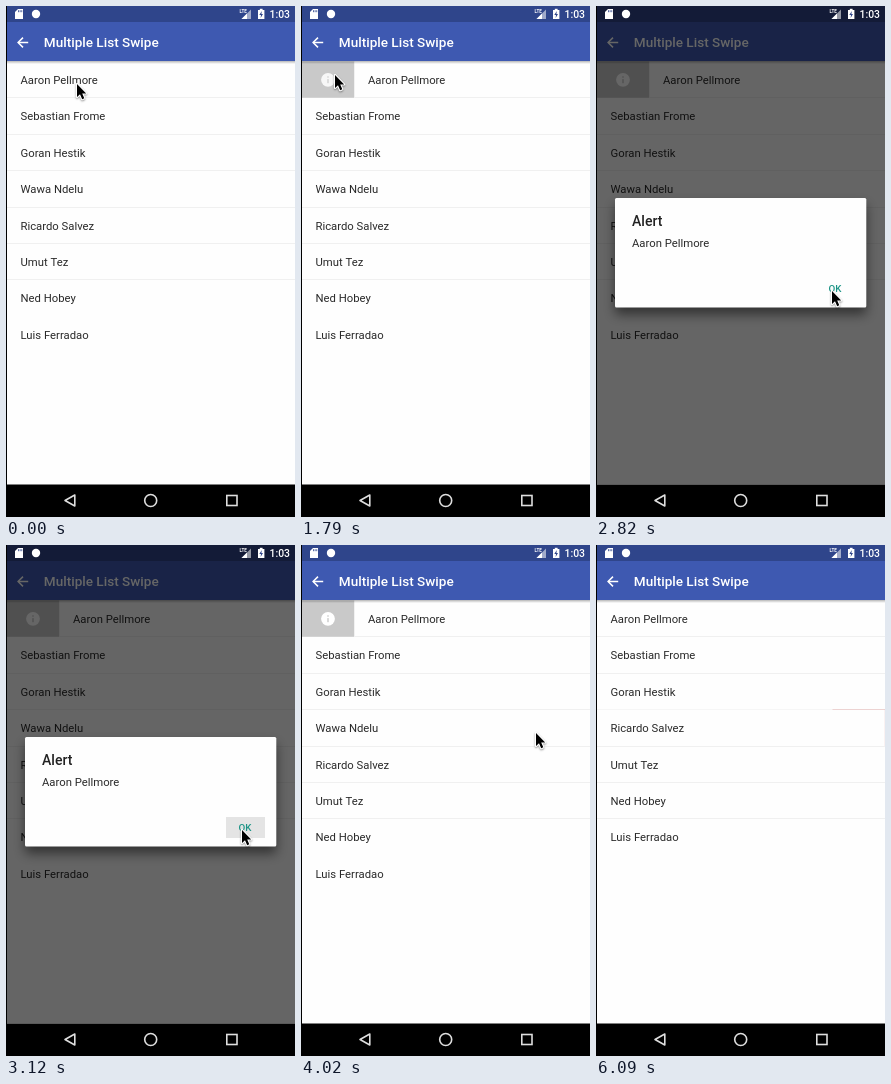
Write an HTML page with a canvas that moves like this. It is 289 px wide and 511 px high and loops after 6.54 s.

```html
<!DOCTYPE html>
<html lang="en">
<head>
<meta charset="utf-8">
<title>Multiple List Swipe</title>
<style>
  html, body { margin: 0; width: 100%; height: 100%; overflow: hidden; background: #000; }
  canvas { display: block; width: 289px; height: 511px; }
</style>
</head>
<body>
<canvas id="stage" width="289" height="511"></canvas>
<script>
const ctx = document.getElementById('stage').getContext('2d');
const W = 289, H = 511, LEFT = 1, LOOP = 6540, TICKS = 44, TICK = LOOP / TICKS;
const LIST_TOP = 55.4, ROW = 36.4, LIST_END = 478.5, OPEN = 52.5, DIVIDERS = 6;
const PAGE = '#fefefe', INK = '#2a2a2a', BAR = '#3e59b1', STATUS = '#2f458b', HIDDEN = '#c9c9c9';
const FONT = 'Roboto, "Noto Sans", sans-serif';
const NAMES = ['Aaron Pellmore', 'Sebastian Frome', 'Goran Hestik', 'Wawa Ndelu',
  'Ricardo Salvez', 'Umut Tez', 'Ned Hobey', 'Luis Ferradao'];
const REMOVED = 3;

// Story beats, in ticks
const BEAT = { release: 6, pressInfo: 12, alert: 13, pressOk: 21, dismiss: 22,
  grab: 28, letGo: 30, pressTrash: 36, remove: 37, end: 41 };

const SPOT = {
  name: { x: 70, y: 77 }, pulled: { x: 183, y: 77 }, info: { x: 33, y: 68 },
  ok: { x: 235, y: 284 }, row: { x: 234, y: 187 }, dragged: { x: 156, y: 187 },
  trash: { x: 252, y: 187 }, outside: { x: 300, y: 470 }
};

const GLIDES = [
  { from: 0, to: BEAT.release, spot: SPOT.pulled },
  { from: BEAT.release, to: 10, spot: SPOT.info },
  { from: BEAT.alert, to: 19, spot: SPOT.ok },
  { from: BEAT.dismiss, to: 27, spot: SPOT.row },
  { from: BEAT.grab, to: BEAT.letGo, spot: SPOT.dragged },
  { from: BEAT.letGo, to: 32, spot: SPOT.trash },
  { from: BEAT.remove, to: BEAT.end, spot: SPOT.outside }
];

function ease(from, to, tick) {
  const p = Math.min(1, Math.max(0, (tick - from) / (to - from)));
  return p * p * (3 - 2 * p);
}

function pointerAt(tick) {
  return GLIDES.reduce((at, { from, to, spot }) => {
    const p = ease(from, to, tick);
    return { x: at.x + (spot.x - at.x) * p, y: at.y + (spot.y - at.y) * p };
  }, SPOT.name);
}

// Damped spring from one value to another
function spring(from, to, ticks) {
  const s = ticks * TICK / 1000;
  if (s > 0.6) return to;
  return to + (from - to) * Math.exp(-11 * s) * (Math.cos(10.5 * s) + 1.05 * Math.sin(10.5 * s));
}

// A dragged row follows the pointer, then springs to rest
function firstRowOffset(tick) {
  if (tick <= BEAT.release) return pointerAt(tick).x - SPOT.name.x;
  if (tick <= BEAT.grab) return spring(SPOT.pulled.x - SPOT.name.x, OPEN, tick - BEAT.release);
  return spring(OPEN, 0, tick - BEAT.grab - 1);
}

function deletedRowOffset(tick) {
  if (tick <= BEAT.grab) return 0;
  if (tick <= BEAT.letGo) return pointerAt(tick).x - SPOT.row.x;
  if (tick < BEAT.remove) return spring(SPOT.dragged.x - SPOT.row.x, -OPEN, tick - BEAT.letGo);
  return spring(-OPEN, 0, tick - BEAT.remove);
}

function rect(x, y, w, h, color) {
  ctx.fillStyle = color;
  ctx.fillRect(x, y, w, h);
}

function text(str, x, y, size, color, weight = 400) {
  ctx.font = `${weight} ${size}px ${FONT}`;
  ctx.fillStyle = color;
  ctx.fillText(str, x, y);
}

function path(points, closed = true) {
  ctx.beginPath();
  points.forEach(([x, y]) => ctx.lineTo(x, y));
  if (closed) ctx.closePath();
}

function fillPath(points, color) {
  path(points);
  ctx.fillStyle = color;
  ctx.fill();
}

function strokePath(points, color, width, closed) {
  path(points, closed);
  ctx.strokeStyle = color;
  ctx.lineWidth = width;
  ctx.stroke();
}

function circle(x, y, r) {
  ctx.beginPath();
  ctx.arc(x, y, r, 0, Math.PI * 2);
}

function disc(x, y, r, color) {
  circle(x, y, r);
  ctx.fillStyle = color;
  ctx.fill();
}

function infoButton(y, pressed) {
  rect(LEFT, y, OPEN, ROW, HIDDEN);
  ctx.globalAlpha = pressed ? 0.85 : 1;
  disc(27, y + 18.4, 6.9, '#fff');
  rect(26.3, y + 14.9, 1.4, 1.4, HIDDEN);
  rect(26.3, y + 17.7, 1.4, 4.1, HIDDEN);
  ctx.globalAlpha = 1;
}

function trashButton(y, pressed) {
  rect(W - OPEN, y, OPEN, ROW, '#ca5c59');
  ctx.globalAlpha = pressed ? 0.85 : 1;
  rect(257, y + 12.6, 11, 1.5, '#fff');
  rect(260, y + 11.8, 5, 1.2, '#fff');
  fillPath([[257.8, y + 15], [267.2, y + 15], [266.7, y + 24.6], [258.3, y + 24.6]], '#fff');
  ctx.globalAlpha = 1;
}

function row(name, index, offset, tick) {
  const y = LIST_TOP + ROW * index, x = LEFT + offset;
  if (offset > 0) infoButton(y, tick === BEAT.pressInfo || tick === BEAT.alert);
  if (offset < 0) trashButton(y, tick === BEAT.pressTrash);
  if (offset) rect(x, y, W - LEFT, ROW, PAGE);
  text(name, x + 13.5, y + 22.6, 11.3, INK);
  if (index < DIVIDERS) rect(x, Math.floor(y + ROW), W - LEFT, 1, '#f0f0f0');
}

function list(tick) {
  const names = NAMES.filter((_, i) => tick < BEAT.remove || i !== REMOVED);
  const offsets = { 0: firstRowOffset(tick), [REMOVED]: deletedRowOffset(tick) };
  names.forEach((name, i) => row(name, i, offsets[i] || 0, tick));
}

function header() {
  rect(0, 0, W, 16, STATUS);
  rect(0, 16, W, 39, BAR);
  const shade = ctx.createLinearGradient(0, 55, 0, 58);
  shade.addColorStop(0, 'rgba(0,0,0,.28)');
  shade.addColorStop(1, 'rgba(0,0,0,0)');
  rect(0, 55, W, 3, shade);
  strokePath([[22.2, 36.5], [12.4, 36.5]], '#fff', 1.5, false);
  strokePath([[17, 31.6], [12.1, 36.5], [17, 41.4]], '#fff', 1.5, false);
  text('Multiple List Swipe', 37.8, 41.4, 13.55, '#fff', 500);
}

function statusIcons() {
  fillPath([[12, 3], [17, 3], [17, 13], [9, 13], [9, 6]], '#fff');
  for (let x = 12; x < 16; x += 1.7) rect(x, 4.2, 0.8, 2, STATUS);
  disc(30, 8, 4.2, '#fff');
  text('LTE', 233.5, 7, 4.6, '#fff', 700);
  fillPath([[245, 3.5], [245, 13], [235.5, 13]], 'rgba(255,255,255,.55)');
  fillPath([[241, 7.5], [241, 13], [235.5, 13]], '#fff');
  rect(252, 4, 6.4, 9, '#fff');
  rect(253.8, 2.8, 2.8, 1.4, '#fff');
  fillPath([[255.8, 5], [253.3, 9], [255, 9], [254.6, 12], [257, 8], [255.4, 8]], STATUS);
  text('1:03', 263.5, 11.8, 10.4, '#fff', 500);
}

function navBar() {
  const y = 494.5, color = '#dedede';
  rect(0, LIST_END, W, H - LIST_END, '#000');
  ctx.lineJoin = 'round';
  strokePath([[59, y], [68.8, y - 5.5], [68.8, y + 5.5]], color, 1.6, true);
  ctx.lineJoin = 'miter';
  circle(144.7, y, 6);
  ctx.stroke();
  ctx.strokeRect(220.8, y - 5, 10.2, 10);
}

function alertBox(pressed) {
  ctx.save();
  ctx.shadowColor = 'rgba(0,0,0,.5)';
  ctx.shadowBlur = 12;
  ctx.shadowOffsetY = 7;
  ctx.beginPath();
  ctx.roundRect(19, 192, 251.3, 109.5, 1.5);
  ctx.fillStyle = PAGE;
  ctx.fill();
  ctx.restore();
  text('Alert', 36, 219.8, 14, '#222', 500);
  text(NAMES[0], 36, 241.2, 11.3, INK);
  if (pressed) rect(220, 272, 39, 21, '#e4e4e4');
  text('OK', 232.6, 286.3, 9.8, '#1c9486', 500);
}

function pointer({ x, y }) {
  const arrow = [[0, 0], [0, 13], [3, 10.3], [5.2, 15.2], [7.3, 14.2], [5.2, 9.4], [9.2, 9.4]]
    .map(([dx, dy]) => [x + dx + 1, y + dy + 1]);
  ctx.save();
  ctx.shadowColor = 'rgba(0,0,0,.4)';
  ctx.shadowBlur = 2;
  ctx.shadowOffsetY = 1;
  ctx.lineJoin = 'round';
  strokePath(arrow, '#fff', 2.2, true);
  ctx.restore();
  fillPath(arrow, '#000');
}

function draw(tick) {
  const alerting = tick >= BEAT.alert && tick < BEAT.dismiss;
  rect(0, 0, W, H, PAGE);
  list(tick);
  header();
  if (alerting) rect(0, 0, W, LIST_END, `rgba(0,0,0,${tick === BEAT.alert ? 0.44 : 0.6})`);
  statusIcons();
  if (alerting) alertBox(tick === BEAT.pressOk);
  navBar();
  if (tick < BEAT.end) pointer(pointerAt(tick));
  rect(0, 0, LEFT, H, '#000');
}

// The screen is refreshed in even steps, 44 to a loop
const start = performance.now();
function frame() {
  const time = (performance.now() - start) % LOOP;
  draw(Math.floor((time + 5) / TICK) % TICKS);
  requestAnimationFrame(frame);
}
frame();
</script>
</body>
</html>
```
